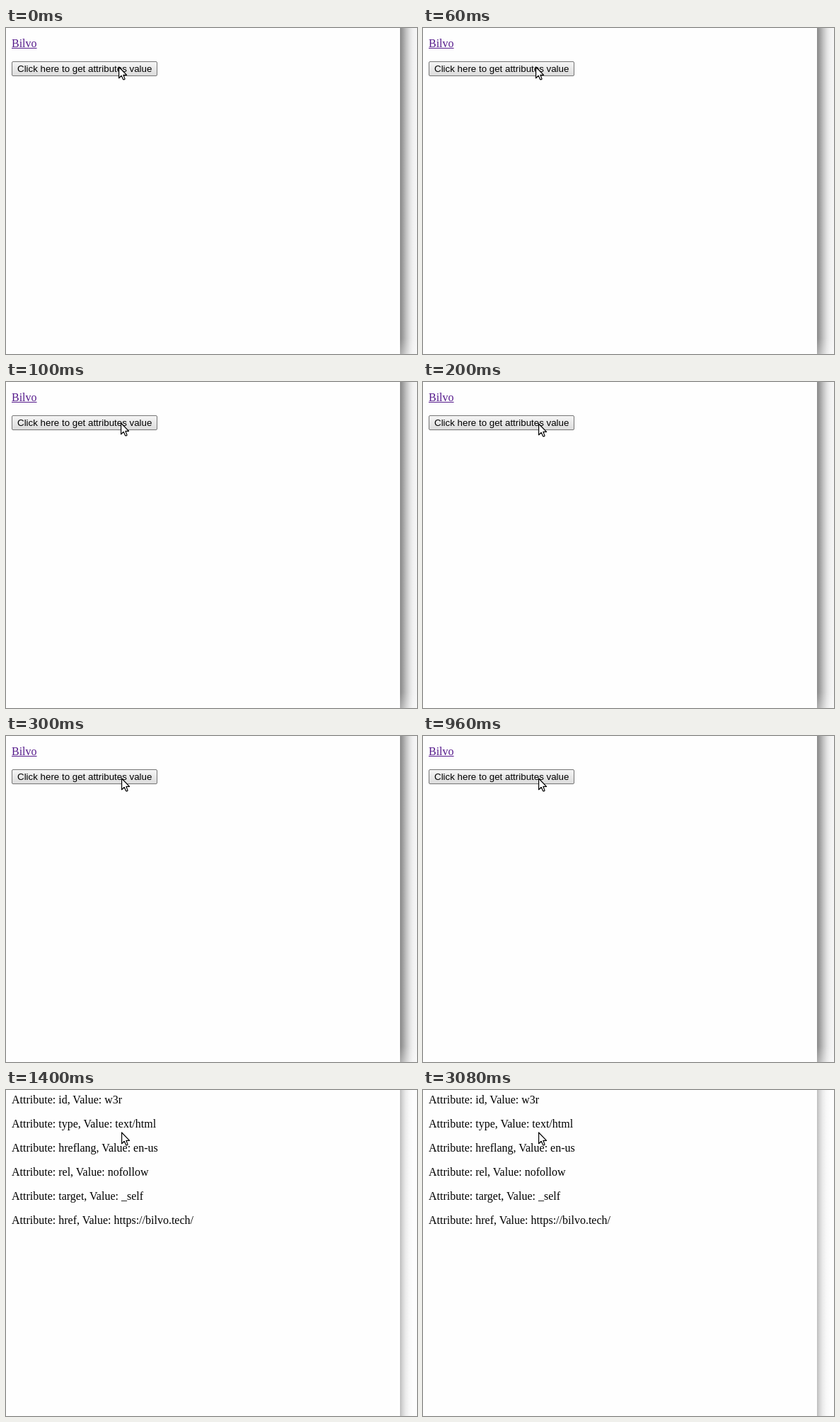
An HTML page for the animation above (4200 ms loop, 581 px wide and 460 px high).

```html
<!DOCTYPE html>
<html lang="en">
<head>
<meta charset="utf-8">
<title>Attribute values</title>
<style>
  html, body { margin: 0; width: 100%; height: 100%; overflow: hidden; background: #fefefe; }
  .stage {
    position: relative; width: 581px; height: 460px; overflow: hidden;
    font: 16px/17px "Liberation Serif", "Times New Roman", serif; color: #000;
  }
  .stage > *, .scene > * { position: absolute; margin: 0; white-space: nowrap; }
  .scene { inset: 0; }
  .before { animation: before 4.2s step-end infinite; }
  .after { visibility: hidden; animation: after 4.2s step-end infinite; }

  .link { left: 8px; top: 13px; color: #551a8b; text-decoration: underline; }
  .button {
    left: 8px; top: 47px; width: 206px; height: 21px; box-sizing: border-box;
    padding: 2px 7px; border: 1px solid #757575; border-radius: 2px;
    background: linear-gradient(#f5f5f5, #dcdcdc);
    font: 13.333px/15px "Liberation Sans", Arial, sans-serif;
  }
  .list { left: 8px; top: 5px; }
  .list p { margin: 0 0 17px; }

  .shadow { left: 557px; top: 0; width: 24px; height: 460px; }
  .before .shadow {
    background:
      linear-gradient(transparent 438px, rgba(255, 255, 255, .3)),
      linear-gradient(90deg, #888, #a0a0a0 4px, #c4c4c4 9px, #e2e2e2 14px, #f0f0f0 18px, #f7f7f7);
  }
  .after .shadow {
    background: linear-gradient(90deg, #bcbcbc, #d2d2d2 3px, #ebebeb 8px, #f8f8f8 13px, #fdfdfd 18px);
  }

  .cursor { left: 0; top: 0; width: 14px; height: 22px; animation: move 4.2s step-end infinite; }

  @keyframes before { 0% { visibility: visible; } 33.333%, 100% { visibility: hidden; } }
  @keyframes after { 0% { visibility: hidden; } 33.333%, 100% { visibility: visible; } }
  @keyframes move {
    0% { transform: translate(159px, 54px); }
    2.381% { transform: translate(162px, 57px); }
    4.762% { transform: translate(163px, 58px); }
    7.143%, 100% { transform: translate(163px, 59px); }
  }
</style>
</head>
<body>
<div class="stage">
  <div class="scene before">
    <span class="link">Bilvo</span>
    <div class="button">Click here to get attributes value</div>
    <div class="shadow"></div>
  </div>
  <div class="scene after">
    <div class="list">
      <p>Attribute: id, Value: w3r</p>
      <p>Attribute: type, Value: text/html</p>
      <p>Attribute: hreflang, Value: en-us</p>
      <p>Attribute: rel, Value: nofollow</p>
      <p>Attribute: target, Value: _self</p>
      <p>Attribute: href, Value: https://bilvo.tech/</p>
    </div>
    <div class="shadow"></div>
  </div>
  <svg class="cursor" viewBox="0 0 14 22">
    <path d="M.6 1V16.7L4.2 13.3L6.6 18.6Q7.8 19.4 9.1 17.9L6.9 12.3H11.6Z"
          fill="#fff" stroke="#000" stroke-width="1.2" stroke-linejoin="round"/>
  </svg>
</div>
</body>
</html>
```
